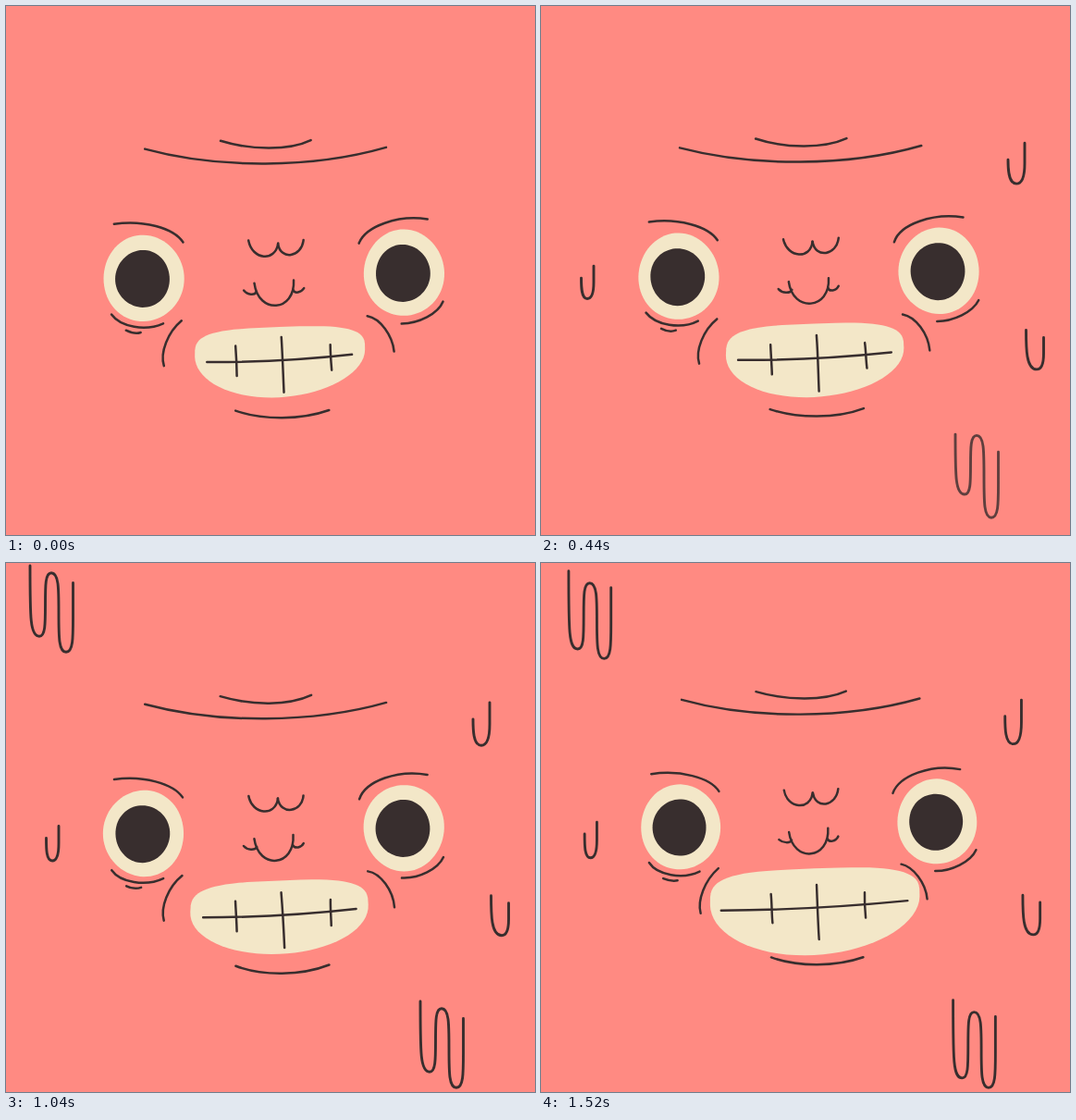
Recreate the animation shown at these times as an HTML page. Size 572 by 572 pixels, loop 1.56 s.

```html
<!DOCTYPE html>
<html lang="en">
<head>
<meta charset="utf-8">
<title>Nervous face</title>
<style>
  html, body { margin: 0; width: 100%; height: 100%; overflow: hidden; background: #ff8a82; }
  svg { display: block; width: 100vw; height: 100vh; }
  path { fill: none; stroke: #382e2e; stroke-width: 2.5; stroke-linecap: round; stroke-linejoin: round; }
  .drop { stroke-width: 2.9; }
  .cream { fill: #f3e7c8; stroke: none; }
  .dark { fill: #382e2e; stroke: none; }
</style>
</head>
<body>
<svg viewBox="0 0 572 572"><g id="scene"><g id="face"></g><g id="sweat"></g></g></svg>
<script>
const LOOP = 1560, STEP = 40, BEAT = 600, LIFT = 19.5;
const [scene, face, sweat] = ['scene', 'face', 'sweat'].map(id => document.getElementById(id));
const clamp = v => Math.min(1, Math.max(0, v));
const mix = (a, b, k) => a + (b - a) * k;
const smooth = (a, b, t) => { const u = clamp((t - a) / (b - a)); return u * u * (3 - 2 * u); };
const power = (v, p) => Math.sign(v) * Math.abs(v) ** p;

// Repeatable noise in -1..1
const noise = n => { const v = Math.sin(n * 127.1 + 11.7) * 43758.5453; return 2 * (v - Math.floor(v)) - 1; };

// Every part is a path whose outline depends on the state { t, boil, open }
const parts = [];
function add(parent, cls, outline) {
  const el = document.createElementNS('http://www.w3.org/2000/svg', 'path');
  el.setAttribute('class', cls);
  parent.appendChild(el);
  const seed = parts.length * 31;
  parts.push(s => el.setAttribute('d', outline(s, seed + s.boil * 977)));
  return el;
}

// Rounded shape; the upper half may be squarer than the lower one
function blob(x, y, w, up, down, square, slope, seed) {
  let d = '';
  for (let i = 0; i < 72; i++) {
    const a = i * Math.PI / 36, upper = a > Math.PI;
    const p = upper ? 2 / square : 1;
    const r = 1 + 0.008 * Math.sin(3 * a + 3 * noise(seed));
    const dx = w * r * power(Math.cos(a), p);
    const dy = (upper ? up : down) * r * power(Math.sin(a), p) + slope * dx;
    d += (i ? 'L' : 'M') + (x + dx).toFixed(2) + ' ' + (y + dy).toFixed(2);
  }
  return d + 'Z';
}

// Arc between two ends; deeper arcs are rounder, lean shifts the belly
function bow(x1, y1, x2, y2, sag, lean, seed) {
  const dx = x2 - x1, dy = y2 - y1, len = Math.hypot(dx, dy);
  const spread = 0.33 + Math.abs(sag) / len, h = sag * 4 / 3 / len;
  const belly = k => [x1 + dx * k - dy * h, y1 + dy * k + dx * h];
  const pts = [[x1, y1], belly(lean - spread / 2), belly(lean + spread / 2), [x2, y2]];
  const [a, b, c, e] = pts.map((p, i) => p.map((v, k) => (v + 0.5 * noise(seed + i * 2 + k)).toFixed(2)));
  return `M${a}C${b} ${c} ${e}`;
}

const line = (x1, y1, x2, y2, sag = 0, lean = 0.5) =>
  add(face, '', (s, seed) => bow(x1, y1, x2, y2, sag, lean, seed));

function eye(x, y) {
  add(face, 'cream', (s, seed) => blob(x, y, 43.6, 46.7, 46.7, 2, 0, seed));
  add(face, 'dark', (s, seed) => blob(x - 1.1, y + 0.5, 29.4, 31, 31, 2, 0, seed));
}

eye(148.8, 294.5);
eye(430.3, 288.5);

// Forehead and brows
line(232, 146, 330, 145, 8, 0.55);
line(150, 155, 411, 153, 16.5);
line(117, 236, 191, 255, -9, 0.6);
line(382, 257, 456, 231, -12, 0.4);
// Nose
line(262, 254, 294, 257, 15, 0.58);
line(294, 257, 322, 253, 14, 0.42);
line(268, 300, 311, 296, 26);
line(257, 308, 271, 309, 3, 0.6);
line(310, 307, 322, 305, 3.5, 0.4);
// Bags, cheeks and chin
line(114, 334, 170, 343, 9, 0.45);
line(130, 351, 146, 353, 1.3);
line(190, 340, 171, 389, 7, 0.55);
line(428, 343, 473, 320, 6.5, 0.55);
line(391, 335, 420, 374, -7, 0.45);
line(248, 438, 349, 437, 8);

// Mouth
add(face, 'cream', (s, seed) => {
  const k = mix(1, 1.25, s.open);
  return blob(295.5, 375.5, 92 * k, 28.5 * k, 47.5 * k, 3.4, -0.04, seed);
});
add(face, '', (s, seed) => {
  const half = mix(78.5, 102.5, s.open), tilt = half * 0.052;
  return bow(296 - half, 380.5 + tilt, 296 + half, 380.5 - tilt, 2.5, 0.5, seed);
});
line(298, 358, 301, 418);
line(248.5, 368, 249.5, 400);
line(350.5, 366, 352, 394);

// Sweat runs through turning points [x, y, speed in px per ms], low ones at odd places
function trickle(turns, t) {
  const pts = turns.map(([x, y, v]) => [x, y + v * (t - BEAT)]), last = pts.length - 1;
  let d = 'M' + pts[0];
  for (let i = 0; i < last; i++) {
    const [x1, y1] = pts[i], [x2, y2] = pts[i + 1], dir = Math.sign(y2 - y1);
    const side = i === 0 ? x1 : i === last - 1 ? x2 : (x1 + x2) / 2;
    const mid = (y1 + y2) / 2;
    const bend = x => 2 * Math.abs(side - x) * dir;
    if (i > 0) d += `C${side} ${y1} ${side} ${y1 + bend(x1)} ${side} ${mid}`;
    d += i < last - 1 ? `C${side} ${y2 - bend(x2)} ${side} ${y2} ${x2} ${y2}` : `L${x2} ${y2}`;
    if (i === 0) continue;
  }
  return d;
}

const drops = [];
function drop(start, ...turns) {
  const el = add(sweat, 'drop', s => trickle(turns, s.t));
  drops.push({ el, start });
}

drop(140, [43.5, 297, 0.0055], [50, 320, 0.009], [57, 284, 0.0055]);
drop(200, [505, 169, 0.0043], [514, 195.5, 0.0085], [523, 151, 0.0043]);
drop(240, [524.5, 355, 0.0155], [536, 397.5, 0.0165], [543.5, 363, 0.0155]);
for (const [start, x, y] of [[280, 448, 468], [450, 26, -3]]) {
  drop(start, [x, y, 0.018], [x + 10, y + 68, 0.037], [x + 23, y + 3, 0.029],
    [x + 39, y + 91, 0.0235], [x + 46.5, y + 19, 0.017]);
}

// Rises, holds, then falls within one beat
const pulse = (t, end) => smooth(45, 215, t) * (1 - smooth(320, end, t));

function liftAt(t) {
  if (t < 2 * BEAT) return -LIFT * pulse(t % BEAT, 470);
  const u = clamp((t - 2 * BEAT) / 320);
  return -9 * (1 - (1 - u) ** 2);
}

function render(now) {
  const t = Math.floor((now % LOOP + 0.5) / STEP) * STEP % LOOP;
  const zoom = 1 - 0.015 * clamp((t - 1400) / 120) ** 2;
  const state = { t, boil: Math.floor(t / (2 * STEP)), open: pulse(t % BEAT, 485) };
  scene.setAttribute('transform',
    `translate(286 286) scale(${zoom}) translate(-286 ${liftAt(t) - 286})`);
  parts.forEach(draw => draw(state));
  drops.forEach(d => d.el.setAttribute('opacity', clamp((t - d.start) / 200)));
}

const begin = performance.now();
function tick() {
  render(performance.now() - begin);
  requestAnimationFrame(tick);
}
tick();
</script>
</body>
</html>
```
